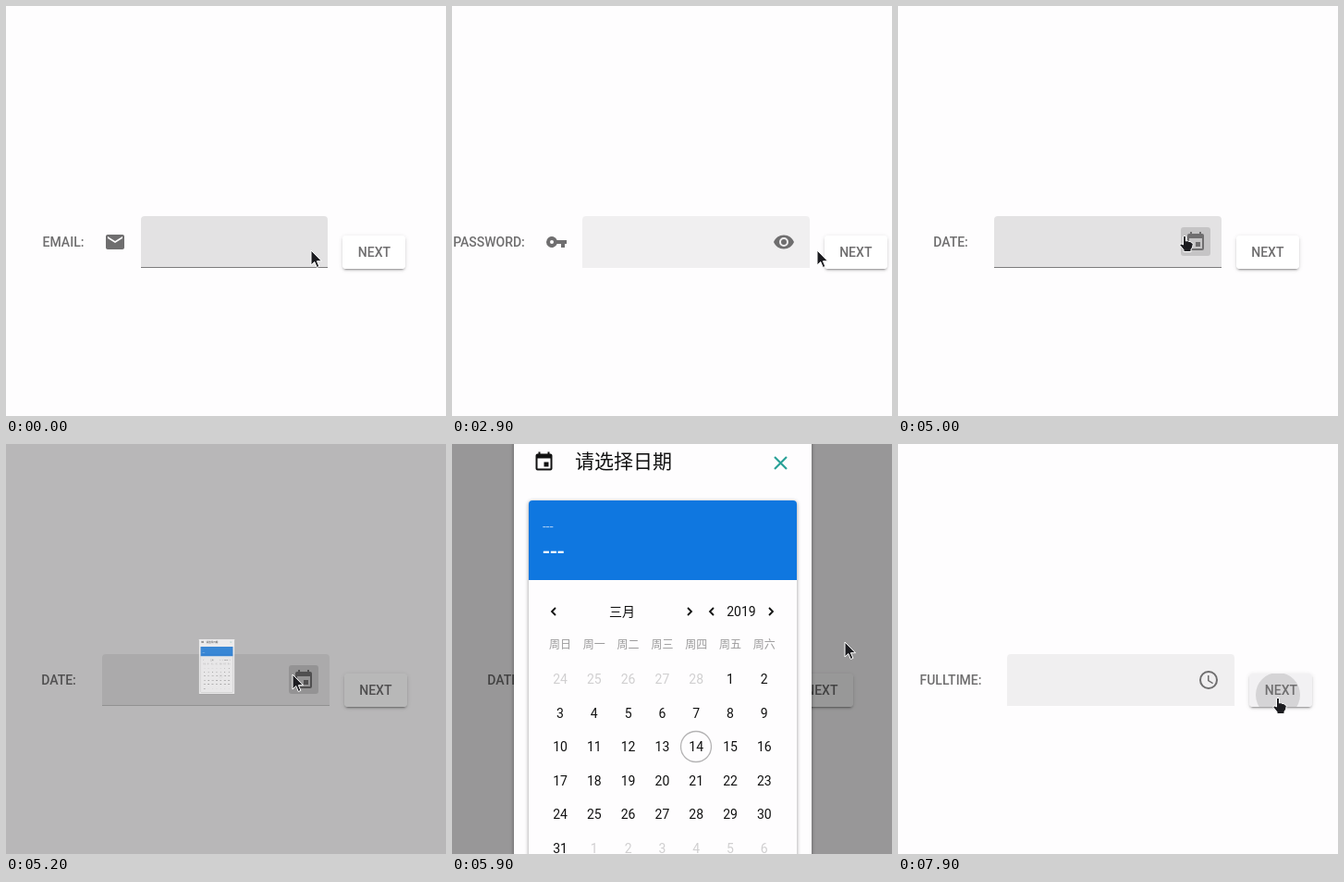
Recreate the animation shown at these times as an HTML page. Size 476x443 px, loop 8 s.

```html
<!DOCTYPE html>
<html lang="zh">
<head>
<meta charset="utf-8">
<style>
html, body { margin: 0; width: 100%; height: 100%; overflow: hidden; background: #fefdfe; }
body { position: relative; font: 500 14px Roboto, "Noto Sans CJK SC", sans-serif; color: #6f6e6f; }
svg { display: block; fill: currentColor; overflow: visible; }
#row { position: absolute; left: 0; top: 227px; width: 472px; height: 56px; display: flex; justify-content: center; white-space: nowrap; }
#row > * { flex: none; }
#label { line-height: 56px; }
#prefix { width: 24px; margin: 16px 16px 0 22px; }
#field { box-sizing: border-box; height: 56px; border-radius: 4px 4px 0 0; border-bottom: 1px solid; position: relative; }
#suffix { position: absolute; right: 12px; top: 12px; width: 32px; height: 31px; border-radius: 3px; }
#suffix svg { margin: 4px; }
#next { position: relative; overflow: hidden; width: 68px; height: 36px; margin: 21px 0 0 16px; border-radius: 4px; text-align: center; line-height: 36px; }
#shadow { position: absolute; width: 68px; height: 36px; border-radius: 4px; box-shadow: 0 3px 1px -2px rgba(0,0,0,.2), 0 2px 2px rgba(0,0,0,.14), 0 1px 5px rgba(0,0,0,.12); }
#ripple { position: absolute; border-radius: 50%; background: #000; }
#shade { position: absolute; inset: 0; background: #000; }
#modal, #cursor { position: absolute; left: 0; top: 0; }
#modal { transform-origin: 228px 240.5px; }
.card { fill: #fefdfe; filter: drop-shadow(0 1px 2px rgba(0,0,0,.4)); }
#modal text { font-weight: 400; text-anchor: middle; }
#modal .left { text-anchor: start; }
.line { fill: none; stroke: #111; stroke-width: 1.8; }
#cursor path { stroke: #fff; stroke-width: 1; fill: #1c1c20; }
</style>
</head>
<body>
<div id="shadow"></div>
<div id="row">
  <span id="label"></span><div id="prefix"></div>
  <div id="field"><div id="suffix"></div></div>
  <div id="next"><div id="ripple"></div><span style="position:relative">NEXT</span></div>
</div>
<div id="shade"></div>
<svg id="modal" width="476" height="443"></svg>
<svg id="cursor" width="20" height="20"><path/></svg>
<script>
const $ = id => document.getElementById(id);
const icons = {
  mail: 'M20 4H4c-1.1 0-2 .9-2 2v12c0 1.1.9 2 2 2h16c1.1 0 2-.9 2-2V6c0-1.1-.9-2-2-2zm0 4l-8 5-8-5V6l8 5 8-5v2z',
  link: 'M3.9 12c0-1.71 1.39-3.1 3.1-3.1h4V7H7a5 5 0 0 0 0 10h4v-1.9H7c-1.71 0-3.1-1.39-3.1-3.1zM8 13h8v-2H8v2zm9-6h-4v1.9h4a3.1 3.1 0 0 1 0 6.2h-4V17h4a5 5 0 0 0 0-10z',
  phone: 'M6.6 10.8c1.4 2.8 3.8 5.1 6.6 6.6l2.2-2.2c.3-.3.7-.4 1-.2 1.1.4 2.3.6 3.6.6.5 0 1 .4 1 1V20c0 .6-.5 1-1 1C10.6 21 3 13.400 3 4c0-.6.5-1 1-1h3.500c.6 0 1 .5 1 1 0 1.300.2 2.500.6 3.600.1.3 0 .7-.3 1z',
  key: 'M12.650 10a6 6 0 1 0 0 4H17v4h4v-4h2v-4zM7 14a2 2 0 1 1 0-4 2 2 0 0 1 0 4z',
  eye: 'M12 4.500C7 4.500 2.730 7.610 1 12c1.730 4.390 6 7.500 11 7.500s9.270-3.110 11-7.500c-1.730-4.390-6-7.500-11-7.500zM12 17a5 5 0 1 1 0-10 5 5 0 0 1 0 10zm0-8a3 3 0 1 0 0 6 3 3 0 0 0 0-6z',
  event: 'M17 12h-5v5h5zM16 1v2H8V1H6v2H5a2 2 0 0 0-2 2v14a2 2 0 0 0 2 2h14a2 2 0 0 0 2-2V5a2 2 0 0 0-2-2h-1V1zm3 18H5V8h14z',
  clock: 'M12 2a10 10 0 1 0 0 20 10 10 0 0 0 0-20zm0 18a8 8 0 1 1 0-16 8 8 0 0 1 0 16zm.5-13H11v6l5.250 3.150.75-1.230-4.500-2.670z'
};
const pointers = {
  arrow: 'M0 0V16l3.800-3.500 2.500 6 2.600-1.100-2.500-5.700H11.500z',
  text: 'M-3-8H3M0-8V8M-3 8H3',
  hand: 'M-1.500 0q1.500-1.500 3 0V5q2-1 3 .5 2-.5 2.700 1 2 0 2 2-.2 4-2.200 5.500V16.500H-1V14.500L-5 9.500q0-2 2-1.500l1.500 1z'
};

// start time, label, prefix icon, suffix icon
const steps = [
  [0, 'EMAIL:', 'mail'], [800, 'URL:', 'link'], [1600, 'TEL:', 'phone'],
  [2300, 'PASSWORD:', 'key', 'eye'], [3600, 'DATE:', '', 'event'],
  [6600, 'TIME:', '', 'clock'], [7800, 'FULLTIME:', '', 'clock']
];
// time, x, y
const moves = [
  [0, 330, 264], [100, 334, 271], [200, 334, 271], [600, 402, 274], [1100, 403, 273], [2000, 398, 272],
  [2900, 395, 264], [3100, 395, 264], [3500, 424, 270], [4100, 420, 268], [4300, 374, 262], [4600, 328, 260],
  [5000, 310, 249], [5200, 310, 249], [5600, 421, 217], [5800, 421, 217], [5900, 425, 214],
  [6200, 408, 273], [7400, 408, 273], [7800, 411, 271], [7900, 411, 275]
];
const scales = [[5100, .1], [5200, .12], [5300, .58], [5400, .86], [5500, .97], [5600, 1], [5900, 1], [6000, .78], [6100, .46], [6200, .177], [6300, .1]];
const fades = [[5100, 0], [5200, .69], [5300, 1], [5900, 1], [6000, .7], [6100, .3], [6200, .035], [6300, 0]];

const clamp = v => Math.max(0, Math.min(1, v));
function at(keys, t, i = 1) {
  const n = keys.findIndex(k => k[0] > t);
  if (n < 0) return keys[keys.length - 1][i];
  if (!n) return keys[0][i];
  const a = keys[n - 1], b = keys[n];
  return a[i] + (b[i] - a[i]) * (t - a[0]) / (b[0] - a[0]);
}
const icon = name => name ? `<svg width="24" height="24"><path fill-rule="evenodd" d="${icons[name]}"/></svg>` : '';

function buildModal() {
  const text = (x, y, s, size = 14, color = '#111', more = '') =>
    `<text x="${x}" y="${y}" font-size="${size}" fill="${color}" ${more}>${s}</text>`;
  const line = (d, more = '') => `<path class="line" d="${d}" ${more}/>`;
  const chevron = (x, dir) => line(`M${x - 2 * dir} 177l${4 * dir} 4l${-4 * dir} 4`);
  let s = '<rect class="card" x="67" y="-6" width="322" height="493" rx="2"/>' +
    `<path fill="#111" fill-rule="evenodd" transform="translate(87.500 7.500)" d="${icons.event}"/>` +
    text(133, 26, '请选择日期', 21, '#111', 'class="left"') +
    line('M349 14l13 13M362 14l-13 13', 'style="stroke:#2aa198;stroke-width:2.200"') +
    '<rect class="card" x="83" y="61" width="290" height="410" rx="4"/>' +
    '<path fill="#0f77e0" d="M83 147V65q0-4 4-4H369q4 0 4 4V147z"/>' +
    text(98, 94, '---', 14, '#a9cdf3', 'class="left"') +
    text(98, 124, '---', 24, '#fff', 'class="left" style="font-weight:500"') +
    chevron(110, -1) + chevron(257, 1) + chevron(281, -1) + chevron(345, 1) +
    text(184, 186, '三月') + text(313, 186, '2019');
  const column = i => 117 + 36.8 * i;
  [...'日一二三四五六'].forEach((d, i) => s += text(column(i), 221, '周' + d, 12, '#9b9a9b'));
  for (let i = 0; i < 42; i++) {
    const day = i - 4, inside = day > 0 && day < 32;
    const n = day < 1 ? day + 28 : inside ? day : day - 31;
    s += text(column(i % 7), 259 + 36.5 * Math.floor(i / 7), n, 14, inside ? '#111' : '#d0cfd0');
  }
  $('modal').innerHTML = s + '<circle cx="264" cy="327" r="16.500" fill="none" stroke="#b4b3b4" stroke-width="1.300"/>';
}

let shown;
function showStep(step) {
  if (step === shown) return;
  shown = step;
  const [, label, prefix, suffix] = step;
  $('label').textContent = label;
  $('prefix').innerHTML = icon(prefix);
  $('prefix').style.display = prefix ? '' : 'none';
  $('suffix').innerHTML = icon(suffix);
  $('field').style.width = (suffix ? 246 : 202) + 'px';
  $('field').style.marginLeft = prefix ? 0 : '28px';
}

function draw(now) {
  const t = Math.floor(now % 8000 / 100) * 100;
  const step = steps.filter(s => s[0] <= t).pop();
  showStep(step);

  const x = at(moves, t, 1), y = at(moves, t, 2);
  const covered = t >= 5100 && t < 6300;
  const over = id => {
    const r = $(id).getBoundingClientRect();
    return !covered && x >= r.left && x <= r.right && y >= r.top && y <= r.bottom;
  };
  const onNext = over('next'), onField = over('field'), onIcon = step[3] && over('suffix');
  const hover = onField ? 1 : covered ? clamp((5250 - t) / 150) : 0;
  $('field').style.background = `rgba(0,0,0,${.055 + .05 * hover})`;
  $('field').style.borderColor = `rgba(0,0,0,${.45 * hover})`;
  $('suffix').style.background = onIcon || t >= 5100 && t < 5300 ? 'rgba(0,0,0,.13)' : 'none';
  $('next').style.background = onNext ? '#f2f1f3' : '#fff';

  const box = $('next').getBoundingClientRect();
  $('shadow').style.left = box.left + 'px';
  $('shadow').style.top = box.top + 'px';

  const age = t - step[0], radius = 46 * clamp(age / 190);
  const ripple = $('ripple').style;
  ripple.width = ripple.height = 2 * radius + 'px';
  ripple.left = at(moves, step[0], 1) - box.left - radius + 'px';
  ripple.top = at(moves, step[0], 2) - box.top - radius + 'px';
  ripple.opacity = step[0] ? .12 * clamp((600 - age) / 350) : 0;

  const fade = at(fades, t);
  $('shade').style.opacity = .405 * fade;
  $('modal').style.opacity = fade ** .8;
  $('modal').style.transform = `scale(${at(scales, t)})`;

  const kind = onNext || onIcon ? 'hand' : onField && t ? 'text' : 'arrow';
  const path = $('cursor').firstChild;
  path.setAttribute('d', pointers[kind]);
  path.style.stroke = kind === 'text' ? '#333' : '#fff';
  $('cursor').style.transform = `translate(${x}px,${y}px)`;
}

buildModal();
const start = performance.now();
function loop() {
  draw(performance.now() - start);
  requestAnimationFrame(loop);
}
loop();
</script>
</body>
</html>
```
